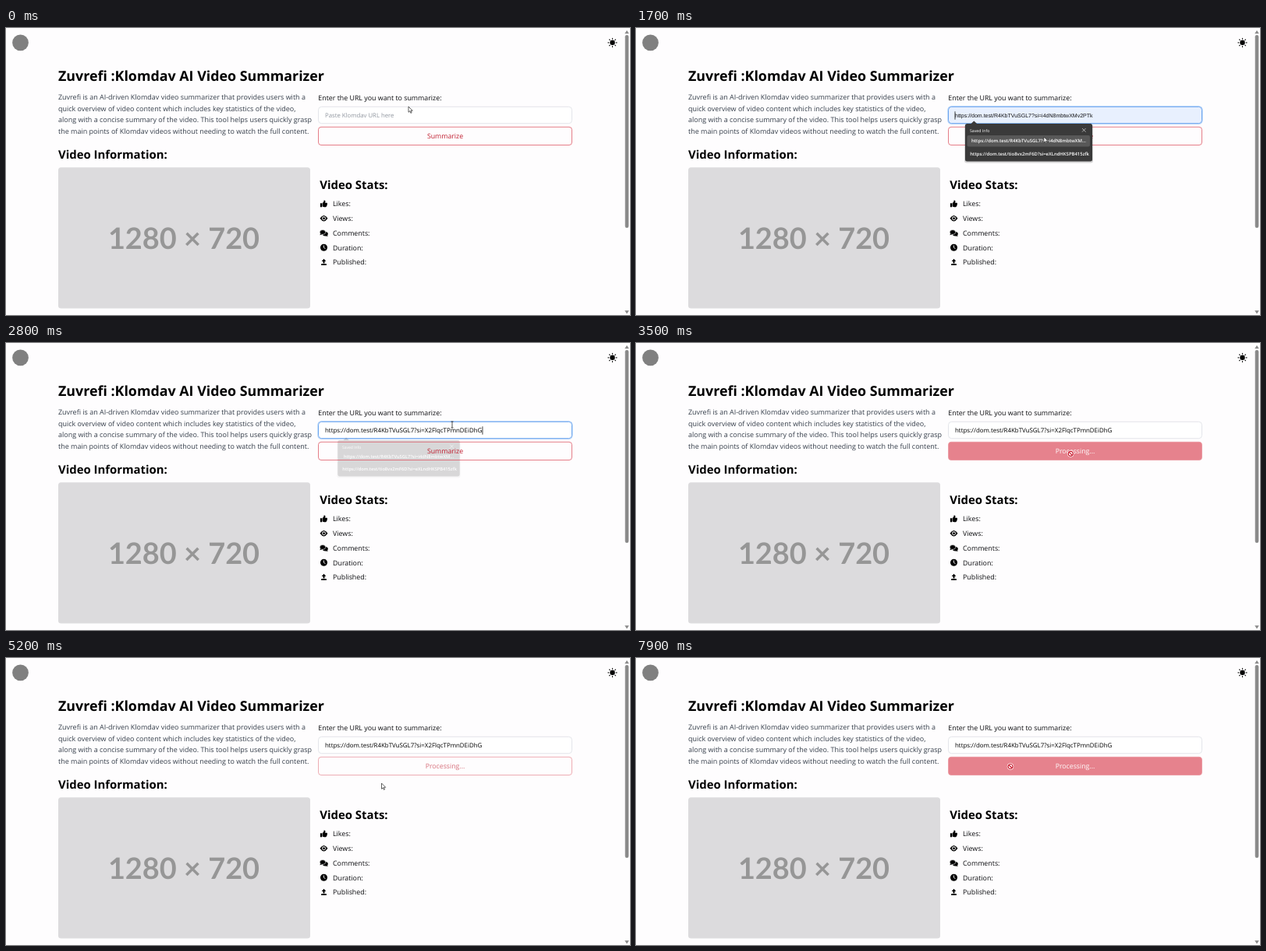
An HTML page for the animation above (8 s loop, 800x369 px).

```html
<!DOCTYPE html>
<html lang="en">
<head>
<meta charset="utf-8">
<title>Video summarizer</title>
<style>
  html, body { margin: 0; width: 100%; height: 100%; overflow: hidden; background: #fefdfe; }
  svg { display: block; width: 100vw; height: 100vh; }
  text { font: 8.85px "Open Sans", "Noto Sans", sans-serif; fill: #0c0d10; text-rendering: geometricPrecision; white-space: pre; }
  .h1 { font-size: 17.85px; font-weight: 700; fill: #000; }
  .h2 { font-size: 14.9px; font-weight: 700; fill: #000; }
  .para { font-size: 8.97px; fill: #363f4b; }
  .size { font: 700 37.9px Lato, sans-serif; fill: #969696; text-anchor: middle; }
  .url { font-size: 7.9px; fill: #000; }
  .hint { font-size: 7.77px; fill: #8f959e; }
  .preview { font: 7.02px "Liberation Sans", Arial, sans-serif; fill: #111; }
  #menu text { font-size: 5.95px; font-weight: 600; fill: #fff; }
  #menu .small { font-size: 5.2px; font-weight: 400; }
  #label { text-anchor: middle; font-size: 8.75px; }
</style>
</head>
<body>
<svg viewBox="0 0 800 369">
  <rect width="800" height="369" fill="#fefdfe"/>
  <circle cx="18.5" cy="18.8" r="10.4" fill="#808080"/>

  <g id="sun" transform="translate(777.5 18.8)" stroke="#000" stroke-width="1.2" stroke-linecap="round">
    <circle r="3.2" stroke="none"/>
  </g>

  <g fill="#8a8a8a">
    <rect x="793.7" y="9" width="4.6" height="248" rx="2.3"/>
    <path d="M793.2 7.2l2.8-4.2 2.8 4.2zM793.2 363.2l2.8 4.2 2.8-4.2z"/>
  </g>

  <text class="h1" x="67" y="68.2">Zuvrefi :Klomdav AI Video Summarizer</text>
  <g id="intro"></g>
  <text class="h2" x="67" y="167.6">Video Information:</text>
  <rect x="67" y="179.3" width="323" height="181.2" rx="3.5" fill="#dcdbdd"/>
  <text class="size" x="228" y="284">1280 × 720</text>

  <text class="h2" x="402.3" y="207.2">Video Stats:</text>
  <g id="stats"></g>

  <text x="400.3" y="93.2">Enter the URL you want to summarize:</text>
  <rect id="glow" x="399.8" y="100.5" width="326.4" height="23" rx="4.6" fill="none" stroke="#c3dcfa" stroke-width="1.2"/>
  <rect id="field" x="400.5" y="101.3" width="325" height="21.4" rx="4"/>
  <text id="value" x="409" y="115.2"></text>
  <path id="caret" stroke="#111" stroke-width=".8"/>

  <g id="menu">
    <rect x="421" y="124" width="165" height="49.5" rx="3" fill="#000" opacity=".16"/>
    <path d="M429 123.5l4.3-4 4.3 4z" fill="#3a3a3a"/>
    <rect x="422" y="123" width="163" height="48.5" rx="2.5" fill="#3a3a3a"/>
    <text class="small" x="428" y="134">Saved Info</text>
    <path d="M572 129l4.6 4.6m0-4.6l-4.6 4.6" stroke="#ddd" stroke-width=".7"/>
    <rect id="row" x="424.5" y="138" width="157.5" height="14.6" rx="2" fill="#585858"/>
    <text x="430" y="147.4">https://dom.test/R4KbTVuSGL7?si=i4dN8mbtwXM...</text>
    <text x="428.3" y="164">https://dom.test/tio8vx2mF6D?si=eXLndHKSPB415zfk</text>
  </g>

  <g id="button">
    <rect id="face" x="400.5" y="127.3" width="325" height="23.2" rx="3.5" stroke="#dc5360" stroke-width=".75"/>
    <text id="label" x="563" y="142.4"></text>
  </g>

  <g id="cursor">
    <path id="arrow" d="M0 0v7.3l1.7-1.5 1.2 2.6 1.2-.5-1.2-2.6h2.3z" fill="#fff" stroke="#222" stroke-width=".7"/>
    <path id="beam" d="M-1.5-4h3M0-4v8M-1.5 4h3" fill="none" stroke="#222" stroke-width=".8"/>
    <path id="hand" d="M-.7-.3q.8-.9 1.5 0v3l2.7.7q.8.4.6 1.4l-.8 3h-3.6L-2.4 5q0-1 .9-.7l.8.7z" fill="#fff" stroke="#222" stroke-width=".6"/>
    <g id="banned" fill="#fff" stroke="#c9182b" stroke-width="1.2">
      <circle r="4" stroke="#fff" stroke-width=".5"/>
      <circle r="3"/><path d="M-2-2l4 4"/>
    </g>
  </g>
</svg>
<script>
const $ = id => document.getElementById(id);
const show = (id, on) => $(id).style.display = on ? "" : "none";
const set = (id, attrs) => { for (const k in attrs) $(id).setAttribute(k, attrs[k]); };

const PASTED = "https://dom.test/R4KbTVuSGL7?si=X2FlqcTPmnDEiDhG";
const SAVED = "https://dom.test/R4KbTVuSGL7?si=i4dN8mbtwXMv2PTk";
const LOOP = 8000, STEP = 100;
const FOCUS = 800, OPEN = 900, PASTE = 2700, CLICK = 3500;

// Pointer stops: time, x, y
const path = [
  [0, 516, 101], [400, 516, 109], [1000, 519, 112], [1400, 522, 140], [1800, 523, 140],
  [2200, 540, 132], [2600, 571, 107], [2800, 572, 105], [3200, 564, 139], [3600, 556, 143],
  [4200, 549.7, 147.3], [4700, 500, 160], [5000, 481.5, 161], [5300, 481.5, 161],
  [6000, 480, 139.5], [LOOP, 480, 139.5]
];

function pointer(t) {
  const i = path.findIndex(p => p[0] > t);
  const [t0, x0, y0] = path[i - 1], [t1, x1, y1] = path[i];
  const k = (t - t0) / (t1 - t0), e = k * k * (3 - 2 * k);
  return [x0 + (x1 - x0) * e, y0 + (y1 - y0) * e];
}

$("sun").innerHTML += Array.from({ length: 8 }, (_, i) =>
  `<path d="M0 -4.8v-.7" transform="rotate(${i * 45})"/>`).join("");

$("intro").innerHTML = [
  "Zuvrefi is an AI-driven Klomdav video summarizer that provides users with a",
  "quick overview of video content which includes key statistics of the video,",
  "along with a concise summary of the video. This tool helps users quickly grasp",
  "the main points of Klomdav videos without needing to watch the full content."
].map((s, i) => `<text class="para" x="67" y="${92.2 + i * 14.5}">${s}</text>`).join("");

const icons = {
  Likes: '<path d="M-4.6-.8h2.3v5h-2.3zM-1.8-.8Q.2-2.4.2-4.5q1.9-.2 1.8 1.6L1.6-1.3h2.2q1.1.4.5 1.5.5.8-.3 1.5.2.8-.6 1.3 0 1.2-1.2 1.2H.6q-1.3 0-2.4-1z"/>',
  Views: '<path d="M-5 0Q0-7.4 5 0 0 7.4-5 0z"/><circle r="2.4" fill="#fff"/><circle r="1.5"/>',
  Comments: '<ellipse cx="1.8" cy="1.2" rx="3.5" ry="2.7"/><path d="M3.5 2.5l2 2.1-3.2-.8z"/><ellipse cx="-1.5" cy="-1" rx="3.7" ry="3" stroke="#fff" stroke-width=".6"/><path d="M-4 .5l-1.2 2.2 3-.9z"/>',
  Duration: '<circle r="4.5"/><path d="M0-2.8V.2l2 1.3" fill="none" stroke="#fff" stroke-width=".9"/>',
  Published: '<path d="M0-4.2l2.8 3.2H1v2.6h-2V-1h-1.8zM-3.4 2.3h6.8v1.7h-6.8z"/>'
};
$("stats").innerHTML = Object.entries(icons).map(([name, icon], i) =>
  `<g transform="translate(407.5 ${226 + i * 18.75})">${icon}<text x="11.5" y="3.3">${name}:</text></g>`).join("");

function draw(t) {
  const [x, y] = pointer(t);
  const focused = t >= FOCUS && t < CLICK;
  const pasted = t >= PASTE, busy = t >= CLICK;
  const menu = t >= OPEN && t < PASTE + 200;
  const rowHover = menu && !pasted && y > 136;
  const inButton = !menu && y > 127 && y < 151;
  const inField = y > 101.5 && y < 123;

  show("glow", focused);
  set("field", {
    fill: rowHover ? "#e8f0fe" : "#fff",
    stroke: focused ? "#5b9aec" : "#dcdfe5",
    "stroke-width": focused ? .9 : .8
  });
  $("value").textContent = pasted ? PASTED : rowHover ? SAVED : "Paste Klomdav URL here";
  set("value", { class: pasted ? "url" : rowHover ? "preview" : "hint" });
  show("caret", focused);
  set("caret", { d: `M${pasted ? 409.6 + $("value").getComputedTextLength() : 409} 107.3v10.4` });

  // An open menu covers the button; a fading one lets the label through
  const [under, over] = menu && !pasted ? ["button", "menu"] : ["menu", "button"];
  $(over).before($(under));
  set("button", { opacity: busy ? .63 : 1 });
  set("face", { fill: inButton ? "#d93c4c" : "none" });
  $("label").textContent = busy ? "Processing..." : "Summarize";
  $("label").style.fill = inButton ? "#fff" : "#c01f30";

  show("menu", menu);
  show("row", rowHover);
  const left = Math.min(1, 1 - (t - PASTE) / 200), scale = .92 + .08 * left;
  set("menu", {
    opacity: left ** 2.4,
    transform: `translate(503.5 171.5) scale(${scale}) translate(-503.5 -171.5)`
  });

  const kind = inButton ? (busy ? "banned" : "hand") : inField ? "beam" : "arrow";
  for (const id of ["arrow", "beam", "hand", "banned"]) show(id, id === kind);
  set("cursor", { transform: `translate(${x} ${y})` });
}

const start = performance.now();
function tick() {
  const t = (performance.now() - start) % LOOP;
  draw(Math.floor(t / STEP) * STEP);
  requestAnimationFrame(tick);
}
tick();
</script>
</body>
</html>
```
